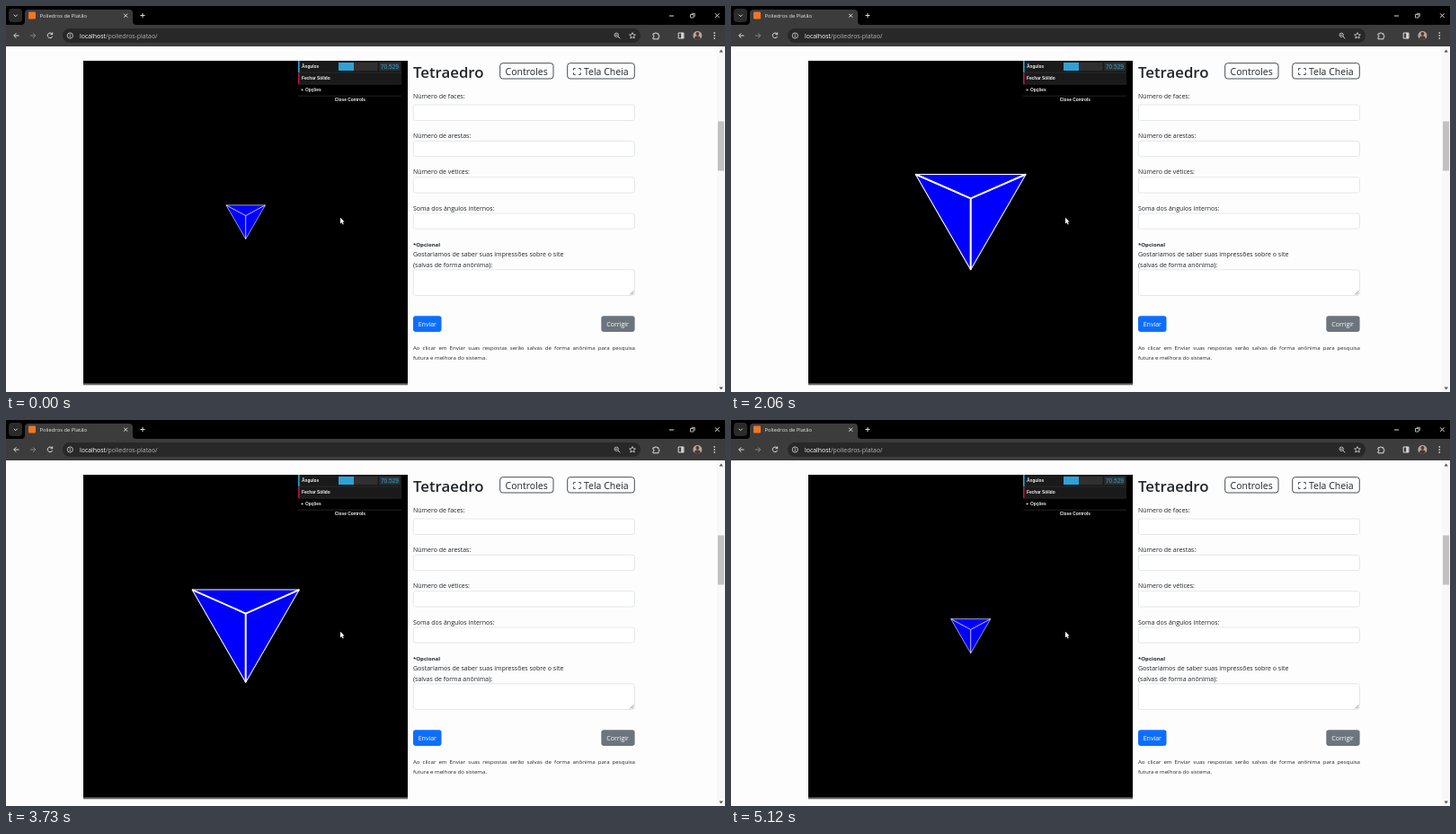
Animation of 800x430 px, one loop 5150 ms. Source, as an HTML page:

```html
<!DOCTYPE html>
<html lang="pt-BR">
<head>
<meta charset="utf-8">
<title>Poliedros de Platão</title>
<style>
html, body { margin: 0; width: 100%; height: 100%; overflow: hidden; background: #fdfdfd; }
svg { position: absolute; left: 0; top: 0; font-family: "Open Sans", "Noto Sans", sans-serif; }
.label { font-size: 7px; fill: #212529; }
.title { font-size: 16.8px; font-weight: 600; fill: #212529; }
.big { font-size: 10.5px; fill: #212529; }
.gui { font: bold 4.8px "Liberation Sans", Arial, sans-serif; fill: #eee; }
.field { fill: #fff; stroke: #dee2e6; stroke-width: .8; }
.outline { fill: none; stroke: #343a40; stroke-width: .9; }
.icon { fill: none; stroke: #ddd; stroke-width: 1; }
p {
  position: absolute; left: 453px; top: 374.6px; width: 247px; margin: 0;
  font: 6.1px/11.2px "Open Sans", "Noto Sans", sans-serif; color: #212529; text-align: justify;
}
</style>
</head>
<body>
<svg width="800" height="430" viewBox="0 0 800 430">
  <!-- browser window -->
  <rect width="800" height="22"/>
  <path d="M17 21q4 0 4-4V8q0-4 4-4h112q4 0 4 4v9q0 4 4 4z" fill="#3c3c3c"/>
  <rect y="21" width="800" height="24" fill="#3c3c3c"/>
  <rect x="3" y="3" width="15" height="15" rx="4" fill="#2b2b2b"/>
  <rect x="25" y="6.5" width="8" height="8" rx="1" fill="#f37623"/>
  <text x="37.5" y="13.2" font-size="5.85" fill="#e8e8e8">Poliedros de Platão</text>
  <rect x="63" y="25" width="643" height="16" rx="8" fill="#282828"/>
  <text x="82" y="35.5" font-size="6.92" fill="#fff">localhost<tspan fill="#b4b4b4">/poliedros-platao/</tspan></text>
  <g class="icon">
    <path d="M8.7 9.7l2 2 2-2M131.2 8.7l4 4m0-4l-4 4M149.5 10.5h5m-2.5-2.5v5M738 11h5M789 8.3l4.6 4.6m0-4.6l-4.6 4.6"/>
    <path d="M761.5 9.5h3.5v3.5h-3.5zM762.8 8.3h3.5v3.5" stroke-width=".8"/>
    <path d="M14.5 33H8.8m2.6-2.7L8.7 33l2.7 2.7"/>
    <path d="M27 33h5.7m-2.6-2.7l2.7 2.7-2.7 2.7" stroke="#888"/>
    <path d="M51.2 31a2.8 2.8 0 1 0 .5 2.8M51.7 29.5v2.2h-2.2"/>
    <circle cx="71.3" cy="33" r="3.1" stroke-width=".8"/>
    <path d="M71.3 32.6v2M71.3 31v.8"/>
    <circle cx="679.2" cy="32.3" r="2.2" stroke-width=".8"/>
    <path d="M681 34l2.3 2.3M678 32.3h2.4" stroke-width=".9"/>
    <path d="M697 29.6l1 2.2 2.4.2-1.8 1.6.6 2.4-2.2-1.3-2.2 1.3.6-2.4-1.8-1.6 2.4-.2z" stroke-width=".8"/>
    <path d="M720 30.8h2a1 1 0 0 1 2 0h2v2a1 1 0 0 1 0 2v2h-6v-2a1 1 0 0 0 0-2z"/>
    <path d="M748.2 30h5.8v6h-5.8z"/>
    <path d="M752.4 30v6" stroke-width="2.4"/>
  </g>
  <circle cx="769.4" cy="33" r="5" fill="#b9a79b"/>
  <path d="M766 36.7a3.4 3.4 0 0 1 6.8 0q-3.4 2.6-6.8 0M767.5 31a1.9 1.9 0 0 1 3.8 0a1.9 1.9 0 0 1-3.8 0" fill="#4d3936"/>
  <path d="M788.3 29.3v1.5m0 1.5v1.5m0 1.5v1.5" stroke="#ddd" stroke-width="1.5"/>
  <rect x="791" y="45" width="9" height="385" fill="#f8f8f8"/>
  <rect x="792" y="128.5" width="7" height="55" fill="#c1c1c1"/>
  <path d="M793.5 51.5h4.4l-2.2-3zM793.5 424.5h4.4l-2.2 3z" fill="#555"/>

  <!-- 3D view -->
  <rect x="86" y="61" width="361" height="361"/>
  <rect x="86" y="420.3" width="361" height="2" fill="#666"/>
  <path id="solid" fill="#00f"/>
  <g fill="none" stroke="#fff" stroke-linejoin="round">
    <path id="rim"/>
    <path id="ribs"/>
  </g>

  <!-- control panel -->
  <rect x="325" y="61" width="115" height="26" fill="#1a1a1a"/>
  <path d="M325 74.2h115M325 87.2h115M325 100.2h115" stroke="#2c2c2c" stroke-width=".8"/>
  <rect x="325" y="61" width="1.6" height="13" fill="#2fa1d6"/>
  <rect x="325" y="74.5" width="1.6" height="12.5" fill="#b5173f"/>
  <rect x="370" y="63" width="43.5" height="9" fill="#303030"/>
  <rect x="370" y="63" width="17" height="9" fill="#2fa1d6"/>
  <rect x="415.5" y="63" width="23" height="9" fill="#303030"/>
  <text x="417" y="70" style="font:6.5px 'Liberation Sans',Arial,sans-serif" fill="#2fa1d6">70.529</text>
  <g class="gui">
    <text x="329" y="69">Ângulos</text>
    <text x="329" y="82">Fechar Sólido</text>
    <text x="333" y="95">Opções</text>
    <text x="365.8" y="106">Close Controls</text>
    <path d="M328.8 92v2.8l2-1.4z"/>
  </g>
  <path d="M372 235.8v6.6l1.5-1.4 1.1 2.4 1.1-.5-1.1-2.3h2z" fill="#fff"/>

  <!-- form -->
  <text class="title" x="453" y="79.6">Tetraedro</text>
  <rect class="outline" x="549.7" y="63.7" width="59.3" height="17.3" rx="3"/>
  <rect class="outline" x="624.7" y="63.7" width="74.6" height="17.3" rx="3"/>
  <text class="big" x="555.6" y="76.6">Controles</text>
  <text class="big" x="643" y="76.6">Tela Cheia</text>
  <path class="outline" d="M631.5 71.7v-2.2h2.2m3.4 0h2.2v2.2m0 2.6v2.2h-2.2m-3.4 0h-2.2v-2.2"/>
  <g class="field">
    <rect x="453.2" y="110" width="246.3" height="17.5" rx="2.6"/>
    <rect x="453.2" y="150.4" width="246.3" height="17.2" rx="2.6"/>
    <rect x="453.2" y="190.7" width="246.3" height="17.4" rx="2.6"/>
    <rect x="453.2" y="231" width="246.3" height="17.2" rx="2.6"/>
    <rect x="453.2" y="293.8" width="246.3" height="28.7" rx="2.6"/>
  </g>
  <path d="M694.3 321.5l4-4m-1.8 4l1.8-1.8" stroke="#666" stroke-width=".7"/>
  <g class="label">
    <text x="453" y="103.2">Número de faces:</text>
    <text x="453" y="147.4">Número de arestas:</text>
    <text x="453" y="187.4">Número de vétices:</text>
    <text x="453" y="227.8">Soma dos ângulos internos:</text>
    <text x="453" y="268.2" font-weight="700" style="font-size:6.05px">*Opcional</text>
    <text x="453" y="279.3">Gostariamos de saber suas impressões sobre o site</text>
    <text x="453" y="290.5">(salvas de forma anônima):</text>
  </g>
  <rect x="453" y="345.3" width="31.5" height="17.6" rx="2.8" fill="#0d6efd"/>
  <rect x="662.3" y="345.3" width="37.3" height="17.6" rx="2.8" fill="#6c757d"/>
  <g font-size="7" fill="#fff">
    <text x="458.7" y="356.6">Enviar</text>
    <text x="668.3" y="356.6">Corrigir</text>
  </g>
</svg>
<p>Ao clicar em Enviar suas respostas serão salvas de forma anônima para pesquisa futura e melhora do sistema.</p>
<script>
const LOOP = 5150, PEAK = 2870, CX = 266.7, CY = 240.7;
const [solid, rim, ribs] = ["solid", "rim", "ribs"].map(id => document.getElementById(id));

function draw() {
  const t = performance.now() % LOOP;
  const half = (6.66 + 2.13 * Math.cos((t - PEAK) * 2 * Math.PI / LOOP)) ** 2;
  const h = half * Math.sqrt(3) / 2;
  // the apex is nearer to the camera than the base
  const apex = CY - 0.289 / (1 / half - 0.0053);
  const a = `${CX - half} ${CY - h}`, b = `${CX + half} ${CY - h}`, c = `${CX} ${CY + h}`;
  const base = `M${a}L${b}L${c}z`;
  solid.setAttribute("d", base);
  rim.setAttribute("d", base);
  ribs.setAttribute("d", [a, b, c].map(p => `M${CX} ${apex}L${p}`).join(""));
  rim.setAttribute("stroke-width", Math.max(0.6, half * 0.017));
  ribs.setAttribute("stroke-width", Math.max(0.75, half * 0.033));
  requestAnimationFrame(draw);
}
draw();
</script>
</body>
</html>
```
